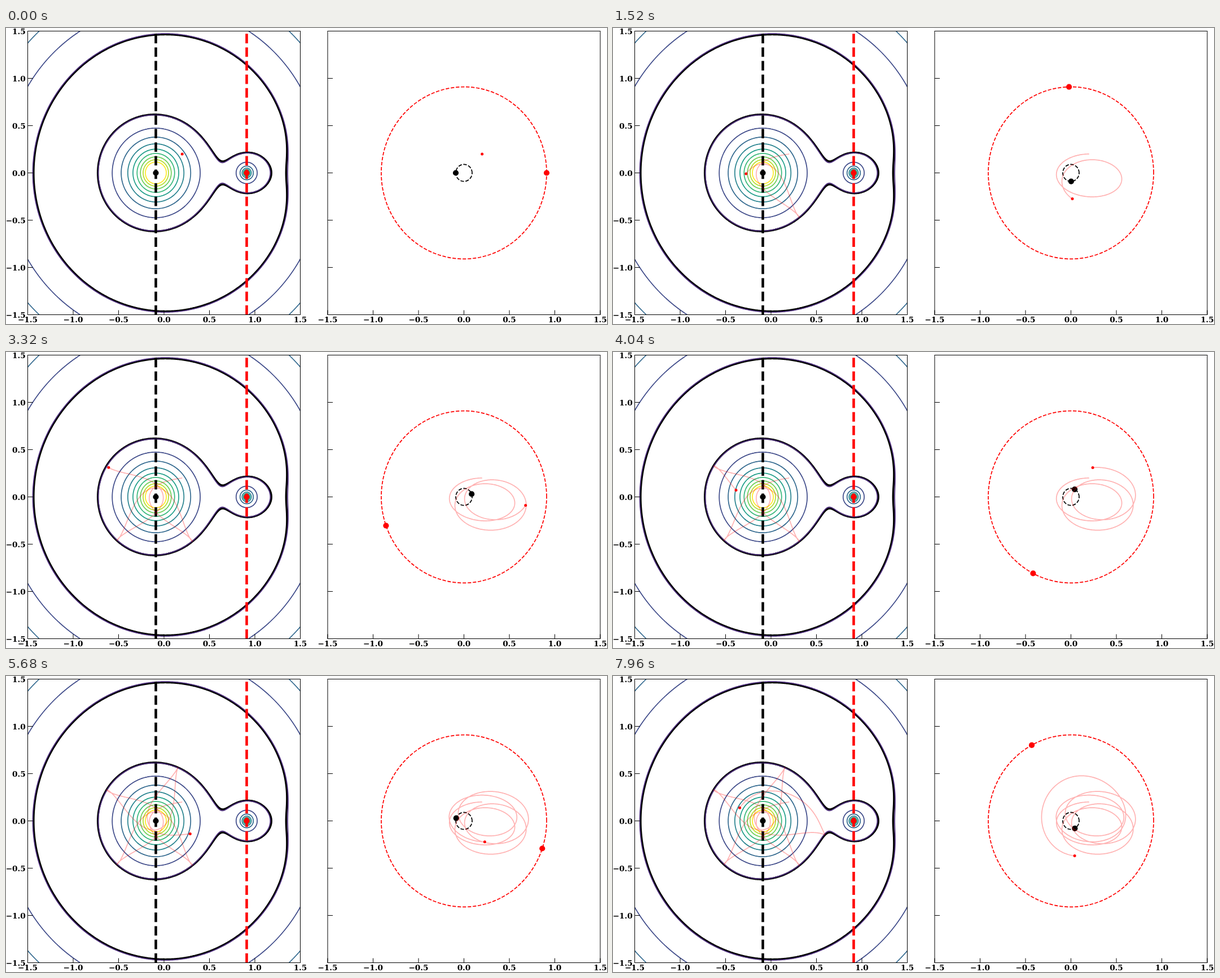
Write an HTML page with a canvas that moves like this. It is 1065 px wide and 526 px high and loops after 8000 ms.

```html
<!DOCTYPE html>
<html lang="en">
<head>
<meta charset="utf-8">
<title>Restricted three-body orbit</title>
<style>
  html, body { margin: 0; width: 100%; height: 100%; overflow: hidden; background: #fff; }
  canvas, svg { position: absolute; left: 0; top: 0; display: block; }
  text { font: bold 13.65px "DejaVu Serif", "DejaVu Sans", serif; }
</style>
</head>
<body>
<canvas id="stage" width="1065" height="526"></canvas>
<svg id="labels" width="1065" height="526"></svg>
<script>
const W = 1065, H = 526;
const SX = 161, SY = 168, CY = 257.5;      // pixels per unit, shared middle line
const ROT = 280, FIX = 811.5;              // middle of the rotating and the fixed panel
const MU = 0.09, JACOBI = 3.49;
const FRAME_MS = 40, FRAMES = 200;
const STEP = 0.04195, SUB = 24, DT = STEP / SUB;
const LINE = 1.7;
const VIRIDIS = ['#482878', '#3e4a89', '#31688e', '#26828e', '#1f9e89',
                 '#35b779', '#6ece58', '#b5de2b', '#fde725'];

const px = (cx, x) => cx + x * SX;
const py = y => CY - y * SY;

/* ---- orbit ---- */

function deriv([x, y, u, v], t) {
  const c = Math.cos(t), s = Math.sin(t);
  const ax = x + MU * c, ay = y + MU * s;
  const bx = x - (1 - MU) * c, by = y - (1 - MU) * s;
  const a = (1 - MU) / Math.hypot(ax, ay) ** 3, b = MU / Math.hypot(bx, by) ** 3;
  return [u, v, -a * ax - b * bx, -a * ay - b * by];
}

function fly([u, v], steps) {
  let s = [0.2, 0.2, u, v];
  const path = [s];
  const ahead = (k, h) => s.map((q, i) => q + k[i] * h);
  for (let i = 0; i < steps * SUB; i++) {
    const t = i * DT;
    const k1 = deriv(s, t);
    const k2 = deriv(ahead(k1, DT / 2), t + DT / 2);
    const k3 = deriv(ahead(k2, DT / 2), t + DT / 2);
    const k4 = deriv(ahead(k3, DT), t + DT);
    s = s.map((q, j) => q + (k1[j] + 2 * k2[j] + 2 * k3[j] + k4[j]) * DT / 6);
    path.push(s);
  }
  return path;
}

// Shooting method: refine the launch velocity so the orbit meets these [step, x, y].
const WAYPOINTS = [
  [21, 0.558, -0.064], [56, 0.684, -0.049], [83, 0.682, -0.090],
  [118, 0.573, -0.015], [166, 0.527, 0.272], [199, 0.041, -0.368]
];

function misses(vel, n) {
  const path = fly(vel, WAYPOINTS[n - 1][0]);
  return WAYPOINTS.slice(0, n).flatMap(([k, x, y]) => [path[k * SUB][0] - x, path[k * SUB][1] - y]);
}

const dot = (a, b) => a.reduce((sum, q, i) => sum + q * b[i], 0);

function aim() {
  let vel = [-1.6, 0];
  for (let n = 2; n <= WAYPOINTS.length; n++) {
    let damp = 1e-3, r = misses(vel, n);
    for (let i = 0; i < 9; i++) {
      const h = 1e-5;
      const slope = d => misses([vel[0] + d[0], vel[1] + d[1]], n).map((q, j) => (q - r[j]) / h);
      const gx = slope([h, 0]), gy = slope([0, h]);
      const a = dot(gx, gx) * (1 + damp), b = dot(gx, gy), c = dot(gy, gy) * (1 + damp);
      const p = -dot(gx, r), q = -dot(gy, r), det = a * c - b * b;
      const next = [vel[0] + (c * p - b * q) / det, vel[1] + (a * q - b * p) / det];
      const rNext = misses(next, n);
      if (dot(rNext, rNext) < dot(r, r)) {
        const gain = dot(r, r) - dot(rNext, rNext);
        vel = next; r = rNext; damp /= 6;
        if (gain < 1e-9) break;
      } else damp *= 8;
    }
  }
  return vel;
}

const fixedPath = fly(aim(), FRAMES - 1);
const rotPath = fixedPath.map(([x, y], i) => {
  const c = Math.cos(i * DT), s = Math.sin(i * DT);
  return [x * c + y * s, y * c - x * s];
});

/* ---- static picture ---- */

function potential(x, y) {
  return x * x + y * y + 2 * (1 - MU) / Math.hypot(x + MU, y) + 2 * MU / Math.hypot(x - 1 + MU, y);
}

// Marching squares over the left panel.
const NX = 322, NY = 336;
const gridX = i => -1.5 + 3 * i / NX, gridY = j => -1.5 + 3 * j / NY;
const field = Array.from({ length: NY + 1 }, (_, j) =>
  Float64Array.from({ length: NX + 1 }, (_, i) => potential(gridX(i), gridY(j))));

function contour(g, level, color, width) {
  g.beginPath();
  for (let j = 0; j < NY; j++) for (let i = 0; i < NX; i++) {
    const corners = [[i, j], [i + 1, j], [i + 1, j + 1], [i, j + 1]];
    const f = corners.map(([a, b]) => field[b][a] - level);
    const cuts = [];
    for (let k = 0; k < 4; k++) {
      const m = (k + 1) % 4;
      if ((f[k] > 0) === (f[m] > 0)) continue;
      const w = f[k] / (f[k] - f[m]), [a, b] = corners[k], [c, d] = corners[m];
      cuts.push([px(ROT, gridX(a + (c - a) * w)), py(gridY(b + (d - b) * w))]);
    }
    for (let k = 0; k + 1 < cuts.length; k += 2) {
      g.moveTo(...cuts[k]);
      g.lineTo(...cuts[k + 1]);
    }
  }
  g.strokeStyle = color;
  g.lineWidth = width;
  g.lineCap = 'round';
  g.stroke();
  g.lineCap = 'butt';
}

function dashed(g, color, width, trace) {
  g.strokeStyle = color;
  g.lineWidth = width;
  g.setLineDash([3.7 * width, 1.6 * width]);
  g.beginPath();
  trace();
  g.stroke();
  g.setLineDash([]);
}

function disc(g, cx, x, y, r, color) {
  g.fillStyle = color;
  g.beginPath();
  g.arc(px(cx, x), py(y), r, 0, 2 * Math.PI);
  g.fill();
}

function clipPanel(g, cx) {
  g.save();
  g.beginPath();
  g.rect(cx - 1.5 * SX, CY - 1.5 * SY, 3 * SX, 3 * SY);
  g.clip();
}

function axes(g, cx) {
  const left = cx - 1.5 * SX, bottom = CY + 1.5 * SY;
  g.strokeStyle = '#000';
  g.lineWidth = 1;
  g.strokeRect(left, CY - 1.5 * SY, 3 * SX, 3 * SY);
  g.beginPath();
  for (let q = -1.5; q <= 1.5; q += 0.5) {
    g.moveTo(px(cx, q), bottom);
    g.lineTo(px(cx, q), bottom - 8);
    g.moveTo(left, py(q));
    g.lineTo(left + 9, py(q));
  }
  g.stroke();
}

function makeBackdrop() {
  const layer = document.createElement('canvas');
  layer.width = W;
  layer.height = H;
  const g = layer.getContext('2d');
  g.fillStyle = '#fff';
  g.fillRect(0, 0, W, H);

  clipPanel(g, ROT);
  contour(g, JACOBI, '#000', 3.4);
  VIRIDIS.forEach((color, k) => contour(g, 2.9 * 1.209 ** (k + 1), color, LINE));
  for (const [x, color] of [[-MU, '#000'], [1 - MU, '#f00']]) {
    dashed(g, color, 4.55, () => {
      g.moveTo(px(ROT, x), py(-1.5));
      g.lineTo(px(ROT, x), py(1.5));
    });
    disc(g, ROT, x, 0, 5.1, color);
  }
  g.restore();

  for (const [r, color] of [[MU, '#000'], [1 - MU, '#f00']])
    dashed(g, color, LINE, () => g.ellipse(FIX, CY, r * SX, r * SY, 0, 0, -2 * Math.PI, true));
  axes(g, ROT);
  axes(g, FIX);
  return layer;
}

function addLabels() {
  const label = (x, y, q, anchor) =>
    `<text x="${x}" y="${y}" text-anchor="${anchor}">${q.toFixed(1).replace('-', '\u2212')}</text>`;
  let out = '';
  for (let q = -1.5; q <= 1.5; q += 0.5) {
    out += label(px(ROT, q), 523.3, q, 'middle') + label(px(FIX, q), 523.3, q, 'middle');
    out += label(34.8, py(q) + 5, q, 'end');
  }
  document.getElementById('labels').innerHTML = out;
}

/* ---- animation ---- */

const ctx = document.getElementById('stage').getContext('2d');
const backdrop = makeBackdrop();
addLabels();

function trail(cx, path, last) {
  ctx.strokeStyle = 'rgba(255, 0, 0, 0.3)';
  ctx.lineWidth = LINE;
  ctx.lineJoin = 'round';
  ctx.beginPath();
  for (let i = 0; i <= last; i += 3) ctx.lineTo(px(cx, path[i][0]), py(path[i][1]));
  ctx.stroke();
  disc(ctx, cx, path[last][0], path[last][1], 2.5, '#f00');
}

function draw(n) {
  const c = Math.cos(n * STEP), s = Math.sin(n * STEP);
  ctx.drawImage(backdrop, 0, 0);
  trail(ROT, rotPath, n * SUB);
  disc(ctx, FIX, -MU * c, -MU * s, 5.1, '#000');
  disc(ctx, FIX, (1 - MU) * c, (1 - MU) * s, 5.1, '#f00');
  trail(FIX, fixedPath, n * SUB);
}

let start = null;
function tick(now) {
  if (start === null) start = now;
  draw(Math.floor(Math.max(0, now - start) / FRAME_MS) % FRAMES);
  requestAnimationFrame(tick);
}
draw(0);
requestAnimationFrame(tick);
</script>
</body>
</html>
```
